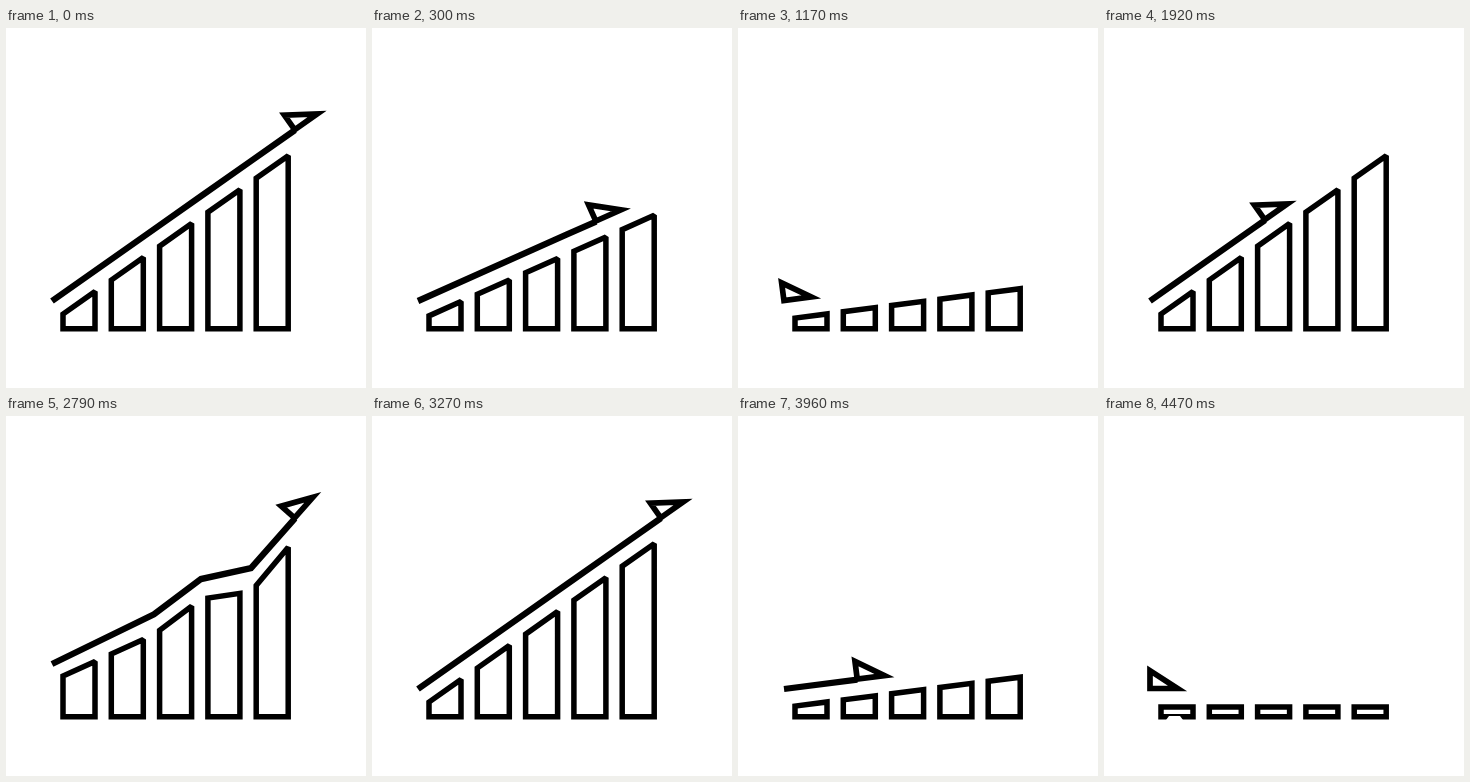
Animation of 360 by 360 pixels, one loop 4500 ms. Source, as an HTML page with a canvas:

```html
<!DOCTYPE html>
<html>
<head>
<meta charset="utf-8">
<style>
html, body { margin: 0; overflow: hidden; background: #fff; }
canvas { display: block; }
</style>
</head>
<body>
<canvas id="stage" width="360" height="360"></canvas>
<script>
const ctx = document.getElementById('stage').getContext('2d');
const LOOP = 4500, X0 = 46, Y0 = 273, FULL_LENGTH = 297, FULL_ANGLE = 0.613;
const NODES = [X0, 148, 195, 245, 289];

const part = (t, from, to) => Math.min(1, Math.max(0, (t - from) / (to - from)));
const sine = p => (1 - Math.cos(Math.PI * p)) / 2;
const smoother = p => p * p * p * (p * (6 * p - 15) + 10);

function angleAt(t) {
  if (t < 860) return FULL_ANGLE * (1 - smoother(part(t, 0, 755)));
  if (t < 3000) return FULL_ANGLE * sine(part(t, 970, 1630));
  return FULL_ANGLE * (1 - smoother(part(t, 3457, 4212)));
}

function lengthAt(t) {
  if (t < 860) return FULL_LENGTH * (1 - sine(part(t, 0, 755)));
  if (t < 3000) return FULL_LENGTH * part(t, 1460, 2130) ** 2;
  return FULL_LENGTH * (1 - sine(part(t, 3457, 4212)));
}

// Vertical offset of each node while the trend line ripples
function rippleAt(t) {
  const w = 2 * Math.PI * part(t, 2310, 3270);
  const fade = Math.min(1, w, 2 * Math.PI - w);
  return [
    -25 * Math.sin(w / 2) ** 2,
    10 * fade * Math.sin(w + 0.3),
    13 * fade * Math.sin(w + 0.4),
    -19 * fade * Math.cos(w),
    -22 * fade * Math.sin(w)
  ];
}

function interpolate(values, x) {
  let i = 0;
  while (i < 3 && x > NODES[i + 1]) i++;
  const p = part(x, NODES[i], NODES[i + 1]);
  return values[i] + (values[i + 1] - values[i]) * p;
}

function path(points, closed) {
  ctx.beginPath();
  points.forEach(([x, y]) => ctx.lineTo(x, y));
  if (closed) ctx.closePath();
}

function draw(t) {
  const angle = angleAt(t), slope = Math.tan(angle), ripple = rippleAt(t);
  const lineY = x => Y0 - (x - X0) * slope + interpolate(ripple, x);
  const barY = x => 291 - (x - 50) * slope + 1.15 * interpolate(ripple, x);

  ctx.fillStyle = '#fff';
  ctx.fillRect(0, 0, 360, 360);
  ctx.strokeStyle = '#000';

  // Square corners, blunt tips
  ctx.lineWidth = 5.5;
  ctx.miterLimit = 1.7;
  for (let i = 0; i < 5; i++) {
    const left = 57 + 48.3 * i, right = left + 32;
    path([[left, 300.7], [left, barY(left)], [right, barY(right)], [right, 300.7]], true);
    ctx.stroke();
  }
  // Notch under the first bar when it lies flat
  if (angle < 0.08) {
    path([[62, 304], [65, 300], [76, 300], [79, 304]], true);
    ctx.fill();
  }

  const endX = X0 + lengthAt(t) * Math.cos(angle), endY = lineY(endX);
  const line = NODES.filter(x => x < endX - 0.5).map(x => [x, lineY(x)]);
  ctx.lineWidth = 6.3;
  ctx.miterLimit = 10;
  path([...line, [endX, endY]]);
  ctx.stroke();

  const tilt = endX > X0 + 6 ? Math.atan2(lineY(endX - 5) - endY, 5) : angle;
  ctx.save();
  ctx.translate(endX, endY);
  ctx.rotate(-tilt);
  ctx.lineWidth = 5.7;
  path([[0, -0.5], [0, -18.3], [27.5, -0.5]], true);
  ctx.fill();
  ctx.stroke();
  ctx.restore();
}

const start = performance.now();
function tick() {
  draw((performance.now() - start) % LOOP);
  requestAnimationFrame(tick);
}
tick();
</script>
</body>
</html>
```
